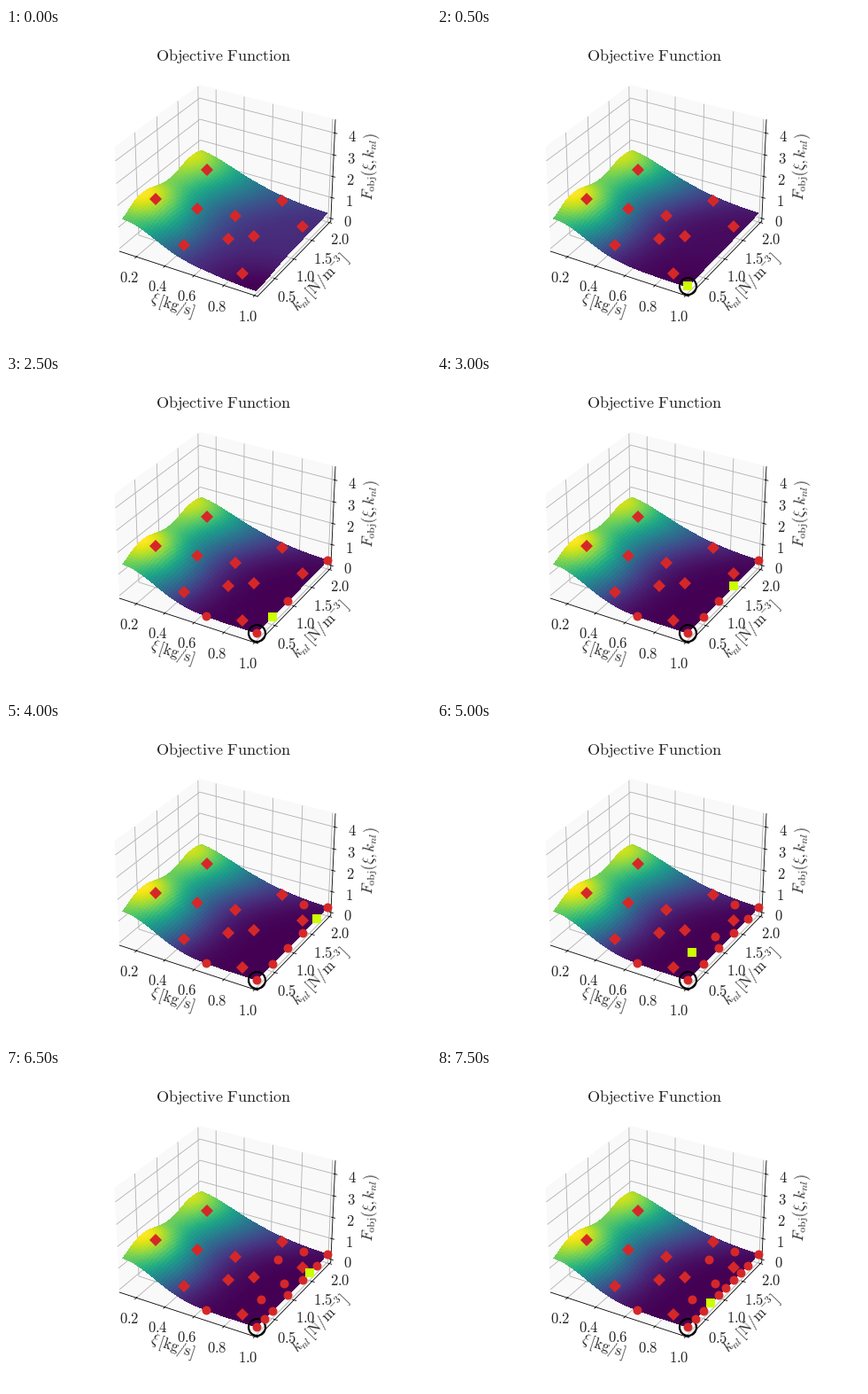
Write a matplotlib script that moves like this. It is 480 px wide and 360 px high and loops after 8000 ms.

```python
import numpy as np
import matplotlib.pyplot as plt
from matplotlib.animation import FuncAnimation

W, H, DPI = 480, 360, 75
PT = 72 / DPI  # points per pixel
RED, LIME, INK = "#d62728", "#ccff00", "0.15"

plt.rcParams.update({
    "mathtext.fontset": "cm",
    "font.family": "Liberation Serif",
    "font.size": 16,
    "text.color": INK,
    "axes.labelcolor": INK,
    "xtick.labelcolor": INK,
    "ytick.labelcolor": INK,
})

X_RANGE, Y_RANGE, Z_RANGE = (0.1, 1.0), (0.1, 2.0), (-0.04, 4.5)

# Initial design, as (xi, k)
DESIGN = [(0.189, 0.575), (0.238, 1.66), (0.36, 0.984), (0.466, 0.297),
          (0.545, 1.279), (0.624, 0.81), (0.736, 1.049), (0.871, 0.247),
          (0.71, 1.914), (0.935, 1.574)]
# The search refines the edge xi = 1 and now and then looks inside
EDGE = [0.1, 0.9, 2.0, 0.5, 1.3, 1.7, 0.3, 1.5, 1.1, 0.7]
INSIDE = {2: (0.67, 0.1), 6: (0.86, 1.9), 8: (0.92, 1.12),
          9: (0.883, 0.66), 11: (0.767, 1.56)}


def objective(x, y, n):
    """Predicted surface after n samples."""
    a = (x - X_RANGE[0]) / np.ptp(X_RANGE)
    b = (y - Y_RANGE[0]) / np.ptp(Y_RANGE)
    ridge = 1.6 - 0.17 * (b - 0.565) + 0.15 * np.cos(2 * np.pi * (b - 0.25) / 0.63)
    ridge -= (0.22 - 0.02 * min(n, 4)) * np.exp(-(b / 0.1) ** 2)
    width = 0.34 + 0.13 * b ** 4
    fall = np.exp(-(a / width) ** (2.1 - 0.5 * b ** 2))
    corner = np.exp(-((1 - a) / 0.35) ** 2 - (b / 0.3) ** 2)
    return 0.23 + (ridge - 0.23) * fall - 0.22 * 0.2 ** n * corner


def on_surface(points):
    x, y = np.array(points).T
    return np.array([x, y, objective(x, y, 2)])


def padded(lo, hi):
    pad = (hi - lo) / 48
    return lo - pad, hi + pad


edge = iter(EDGE)
turns = range(len(EDGE) + len(INSIDE))
SAMPLES = on_surface([INSIDE[t] if t in INSIDE else (1.0, next(edge))
                      for t in turns])

fig = plt.figure(figsize=(W / DPI, H / DPI), dpi=DPI)
ax = fig.add_subplot(projection="3d", computed_zorder=False)
ax.set_title(r"$\mathrm{Objective\ Function}$", fontsize=17.4)
ax.set_xlabel(r"$\xi\,\mathrm{[kg/s]}$")
ax.set_ylabel(r"$k_{nl}\,\mathrm{[N/m^{-3}]}$")
ax.set_zlabel(r"$F_{\mathrm{obj}}(\xi, k_{nl})$")
ax.set_xticks(np.arange(1, 6) / 5)
ax.set_yticks(np.arange(1, 5) / 2)
ax.set_zticks(range(5))
ax.xaxis.set_major_formatter("${x:.1f}$")
ax.yaxis.set_major_formatter("${x:.1f}$")
ax.zaxis.set_major_formatter("${x:.0f}$")
ax.set_xlim(*padded(*X_RANGE))
ax.set_ylim(*padded(*Y_RANGE))
ax.set_zlim(*padded(*Z_RANGE))
for axis in (ax.xaxis, ax.yaxis, ax.zaxis):
    axis.set_pane_color((0.975, 0.975, 0.975, 1))


def markers(shape, size, points=((), (), ()), color=RED, **kw):
    kw = {"mew": 0, "zorder": 5, **kw}
    return ax.plot(*points, shape, ms=size * PT, color=color, **kw)[0]


markers("D", 9.7, on_surface(DESIGN))
ring = markers("o", 19, color="black", mfc="none", mew=2.2 * PT)
past = markers("o", 10)
current = markers("s", 10, color=LIME)

gx, gy = np.meshgrid(np.linspace(*X_RANGE, 50), np.linspace(*Y_RANGE, 50))
surface = None


def draw(n):
    global surface
    if surface is not None:
        surface.remove()
    surface = ax.plot_surface(gx, gy, objective(gx, gy, n), cmap="viridis",
                              rstride=1, cstride=1, linewidth=0,
                              antialiased=False, zorder=1)
    shown = SAMPLES[:, :n]
    ring.set_data_3d(*shown[:, :1])
    past.set_data_3d(*shown[:, :-1])
    current.set_data_3d(*shown[:, -1:])
    return surface, ring, past, current


anim = FuncAnimation(fig, draw, frames=len(turns) + 1, interval=500,
                     repeat=True, repeat_delay=0, blit=False)
plt.show()
```
